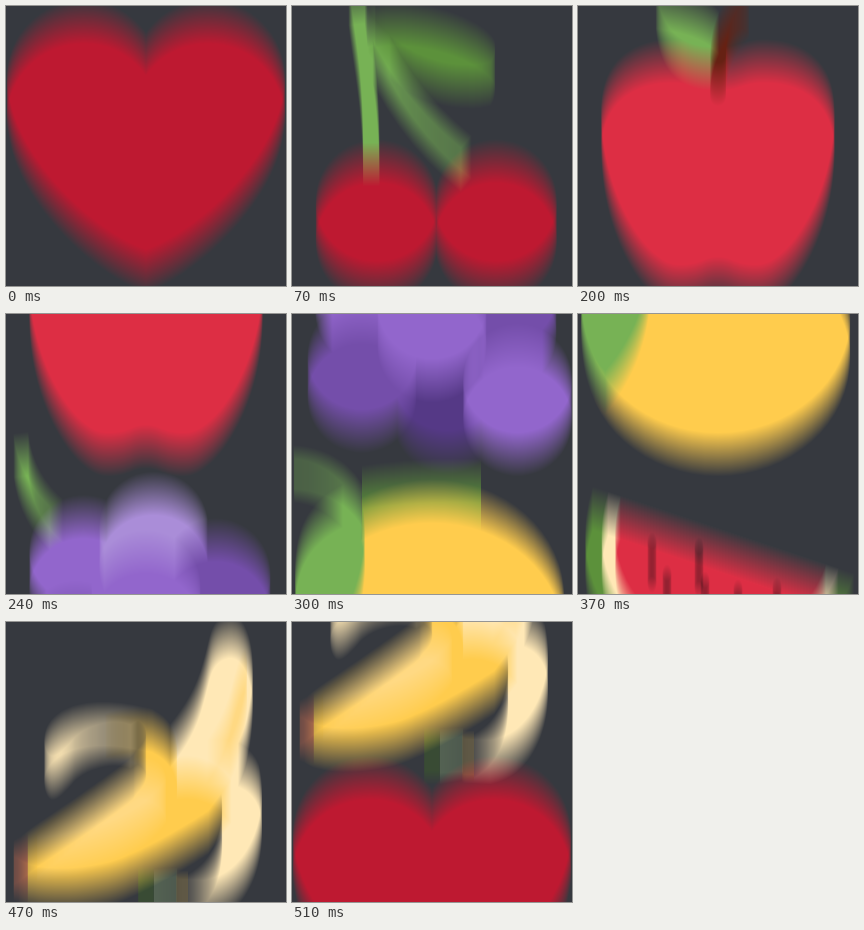
An HTML page with a canvas for the animation above (550 ms loop, 280 by 280 pixels).

```html
<!DOCTYPE html>
<html>
<head>
<meta charset="utf-8">
<style>
  html, body { margin: 0; height: 100%; overflow: hidden; background: #36393f; }
  canvas { display: block; }
</style>
</head>
<body>
<canvas id="stage" width="280" height="280"></canvas>
<script>
const SIZE = 280, BLUR = 22, TALL = SIZE + 2 * BLUR, LOOP = 550;
const BACK = '#36393f', CRIMSON = '#be1931', RED = '#dd2e44', CREAM = '#ffe8b6', YELLOW = '#ffcc4d';
const LEAF = '#5c913b', STEM = '#77b255', VIOLET = '#9266cc', PLUM = '#744eaa';

// Path helpers on a 36 unit grid.
const disc = (x, y, rx, ry = rx) =>
  `M${x - rx} ${y}a${rx} ${ry} 0 1 1 ${2 * rx} 0a${rx} ${ry} 0 1 1 ${-2 * rx} 0z`;
const slice = (rx, ry) => {
  const dx = rx * 0.949, dy = rx * 0.316;
  return `M${18.7 + dx} ${12.5 + dy}A${rx} ${ry} 18.4 0 1 ${18.7 - dx} ${12.5 - dy}z`;
};
const seeds = [[74, 108], [89, 140], [121, 113], [127, 147], [121, 178], [160, 155], [183, 187], [199, 153]]
  .map(([x, y]) => disc(x * 36 / SIZE, y * 36 / SIZE, 0.58, 1.1)).join('');

// Each shape: colour, path, optional stroke width.
const heart = [
  [CRIMSON, 'M35.885 11.833c0-5.45-4.418-9.868-9.867-9.868-3.308 0-6.227 1.633-8.018 4.129-1.791-2.496-4.71-4.129-8.017-4.129-5.45 0-9.868 4.417-9.868 9.868 0 .772.098 1.52.266 2.241C1.751 22.587 11.216 31.568 18 34.034c6.783-2.466 16.249-11.447 17.617-19.959.17-.721.268-1.469.268-2.242z'],
];
const cherries = [
  [CRIMSON, disc(10.9, 27.7, 7.85) + disc(26.2, 27.7, 7.85)],
  [STEM, 'M9.6 2.5C12 9 16 15 22.4 20.2', 2.2],
  [LEAF, 'M9.6 3C13 .8 24 3.5 26 7C26.3 8 26 9.5 25.5 10C22 11 14 10 9.6 3z'],
  [STEM, 'M8.3-.5C9 6 10.2 10 10.2 20.3', 2.1],
];
const diamond = [
  ['#bdddf4', 'M13 3H7l-7 10h10z'],
  ['#5dadec', 'M36 13l-7-10h-6l3 10z'],
  ['#4289c1', 'M26 13h10L18 33z'],
  ['#8ccaf7', 'M10 13H0l18 20zM13 3l-3 10h16l-3-10z'],
  ['#5dadec', 'M18 33l-8-20h16z'],
];
const apple = [
  [RED, 'M24 7c-3 0-3 1-6 1s-3-1-6-1c-4 0-9 2-9 9 0 11 6 20 10 20 3 0 3-1 5-1s2 1 5 1c4 0 10-9 10-20 0-7-5-9-9-9z'],
  [STEM, 'M17.64 2.783C15.41.65 10 0 10 0s.137 4.083 2.367 6.217C14.598 8.35 18 8 18 8s1.872-3.083-.36-5.217z'],
  ['#662113', 'M18 10c-.552 0-1-.447-1-1 0-3.441 1.2-6.615 3.293-8.707.391-.391 1.023-.391 1.414 0s.391 1.023 0 1.414C19.986 3.427 19 6.085 19 9c0 .553-.447 1-1 1z'],
];
const grapes = [
  [STEM, 'M1.9 0C2.4 4 4 7 7 9.5', 1.9],
  [VIOLET, disc(10, 15, 7)],
  ['#aa8dd8', disc(19, 12, 7)],
  [PLUM, disc(27, 18, 7)],
  ['#553986', disc(20, 28.7, 7)],
  [PLUM, disc(9, 26, 7)],
  [VIOLET, disc(18, 19.5, 7) + disc(29, 29, 7)],
];
const lemon = [
  [STEM, 'M.2 1.6C4 1.7 7.5 3.6 9.3 7L8.5 9C6 5.5 3.5 3.7 .3 3.4z'],
  [LEAF, 'M9 4.2Q17 3 24.3 3.4V9H9z'],
  [YELLOW, disc(18, 21, 17, 15)],
  [STEM, 'M7.8 6C9.3 8 9.6 12 9.2 14.5C8.8 19 7 24 3.5 28C1.2 26 .3 21 .4 17C.6 12 2 8.5 7.8 6z'],
];
const watermelon = [
  [LEAF, slice(17.7, 18.4)],
  [CREAM, slice(15.6, 16.2)],
  [RED, slice(13.9, 14)],
  ['#1c0d12', seeds],
];
const banana = [
  [CREAM, 'M28 2c2.684-1.342 5 4 3 13-1.106 4.977-5 9-9 12s-11-1-7-5 8-7 10-13c1.304-3.912 1-6 3-7z'],
  ['#ffd983', 'M31 8c0 3-1 9-4 13s-7 5-4 1 5-7 6-11 2-7 2-3z'],
  [CREAM, 'M19 14C12 12 6 13 5 17c-.3 1.5.3 3 1 3s1.6-1 2.5-2C10 16 14 15 16 16z'],
  [CREAM, 'M22 20C25 17 31 17 32.5 21C34 27 31.5 35 25.5 36L22 35.8C26 34.3 27.8 31 27.8 26C27.8 22 25 21 22 20z'],
  [YELLOW, 'M22 20c-.296.592 1.167-3.833-3-6-1.984-1.032-10 1-4 1 3 0 4 2 2 4-.291.292-.489.603-.622.912-.417.346-.873.709-1.378 1.088-2.263 1.697-5.84 4.227-10 7-3 2-4 3-4 4 0 3 9 3 14 1s11-6 11-6l3-4c-3-4-7-3-7-3z'],
  ['#ffd983', 'M4 30C9 26 15 21 17 20C19 20 20.6 21 20.6 23C18 27 11 30 4 30.5z'],
  ['#c1694f', 'M1 30.8L2.8 29.8V33.5L1 33z'],
  ['#a6d388', 'M19 34.5L22 34.3V35.5L19 36z'],
  [YELLOW, 'M21.9 34.7H23.4V35.7H21.9z'],
  ['#3e721d', 'M17 34.2H19V36H17z'],
];
const symbols = [heart, cherries, diamond, apple, grapes, lemon, watermelon, banana];

function paint(ctx, shapes, top) {
  ctx.save();
  ctx.translate(0, top);
  ctx.scale(SIZE / 36, SIZE / 36);
  for (const [color, path, width] of shapes) {
    ctx.fillStyle = ctx.strokeStyle = color;
    ctx.lineWidth = width || 1;
    if (width) ctx.stroke(new Path2D(path));
    else ctx.fill(new Path2D(path));
  }
  ctx.restore();
}

// Vertical box blur of the visible rows.
function smear(ctx) {
  const image = ctx.getImageData(0, 0, SIZE, TALL);
  const from = image.data.slice(), row = SIZE * 4;
  for (let col = 0; col < row; col++) {
    const at = y => from[y * row + col];
    let sum = 0;
    for (let y = 0; y < 2 * BLUR; y++) sum += at(y);
    for (let y = BLUR; y < BLUR + SIZE; y++) {
      image.data[y * row + col] = sum / (2 * BLUR);
      sum += at(y + BLUR) - at(y - BLUR);
    }
  }
  ctx.putImageData(image, 0, 0);
}

// Even steps hold one symbol, odd steps the halves of two neighbours.
function makePose(step) {
  const canvas = document.createElement('canvas');
  canvas.width = SIZE;
  canvas.height = TALL;
  const ctx = canvas.getContext('2d');
  ctx.fillStyle = BACK;
  ctx.fillRect(0, 0, SIZE, TALL);
  const index = step >> 1, odd = step % 2;
  paint(ctx, symbols[index], BLUR - odd * SIZE / 2);
  if (odd) paint(ctx, symbols[(index + 1) % symbols.length], BLUR + SIZE / 2);
  smear(ctx);
  return canvas;
}

// The reel jumps half a symbol at each of these times.
const jumps = [30, 70, 100, 140, 170, 200, 240, 270, 300, 340, 370, 410, 440, 470, 510];
const poses = [0, ...jumps].map((_, step) => makePose(step));
const stage = document.getElementById('stage').getContext('2d');
const start = performance.now();

function draw() {
  const time = (performance.now() - start) % LOOP;
  const step = jumps.filter(jump => jump <= time).length;
  stage.drawImage(poses[step], 0, -BLUR);
  requestAnimationFrame(draw);
}
draw();
</script>
</body>
</html>
```
